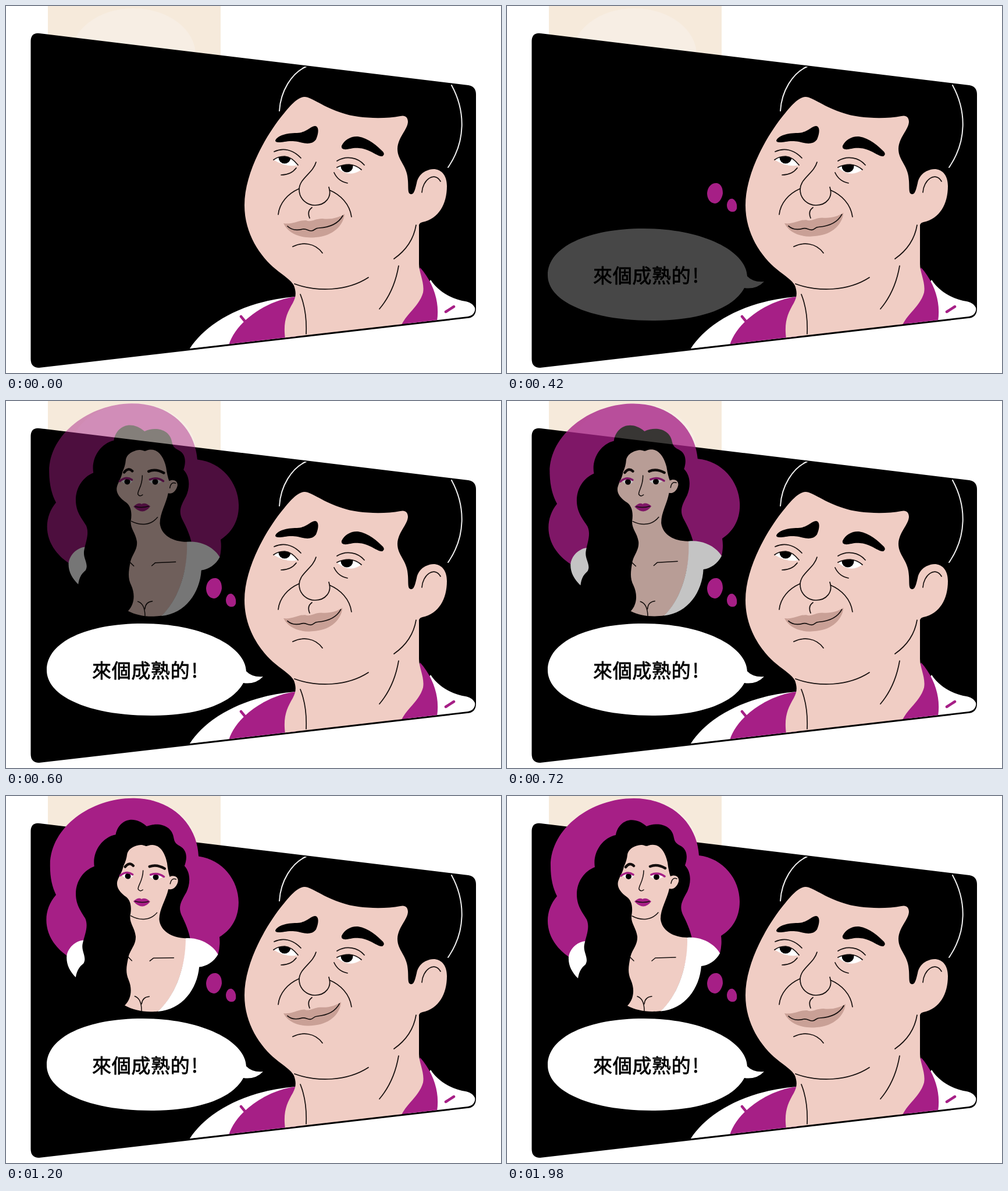
Write an HTML page that moves like this. It is 851 px wide and 630 px high and loops after 2.4 s.

```html
<!DOCTYPE html>
<html lang="zh-Hant">
<head>
<meta charset="utf-8">
<style>
  html, body { margin: 0; width: 100%; height: 100%; overflow: hidden; background: #fff; }
  svg { display: block; }
  .skin { fill: #f0cdc4; }
  .plum { fill: #a61f86; }
  .white { fill: #fff; }
  .line { fill: none; stroke: #150f0e; stroke-width: 1.7; stroke-linecap: round; stroke-linejoin: round; }
  .mark { fill: none; stroke: #a61f86; stroke-width: 4.5; stroke-linecap: round; }
  text { font: 500 33px "Noto Sans CJK TC", "Noto Sans CJK", sans-serif; letter-spacing: .7px; stroke: #000; stroke-width: .8px; }
</style>
</head>
<body>
<svg width="851" height="630" viewBox="0 0 851 630">
  <defs>
    <clipPath id="panel">
      <path d="M44 62Q44 46 60 49L794 138Q806.500 140 806.500 153V518Q806.500 531 794 533L60 617.500Q44 619 44 603Z"/>
    </clipPath>
    <clipPath id="eyeL"><path id="ballL" d="M460 264Q468 258 479 258Q491 259 502 273Q483 278 460 264Z"/></clipPath>
    <clipPath id="eyeR"><path id="ballR" d="M569 277Q579 272 590 272Q602 273 611 281Q597 291 583 286Q575 283 569 277Z"/></clipPath>
  </defs>

  <path fill="#f6eadb" d="M72 0H369V100H72Z"/>
  <ellipse cx="219" cy="84" rx="107" ry="80" fill="#f7eee4"/>
  <path d="M42.500 61Q42.500 45 58 47L795 136Q808 138 808 152V519Q808 534 795 535.800L59 620.800Q42.500 622 42.500 606Z"/>

  <g id="man" clip-path="url(#panel)">
    <path class="white" d="M316 588C343 546 405 507 497 499L500 568L316 588.500ZM730 470C745 493 770 504 790 507C800 509 807 515 807 523V545H680Z"/>
    <path class="plum" d="M497 499C450 505 396 540 383 582L500 570ZM712 449C735 475 746 508 741 541L670 552Z"/>
    <path class="skin" d="M513 156C498 157 483 178 467 198C442 232 410 290 410 342C410 391 437 430 464 452C477 463 490 470 495 480C499 491 499 499 493 510C483 527 476 542 480 571L680 547C690 527 711 514 717 492C720 475 710 458 710 443V376Q711 372 716 371C744 365 758 340 758 309C758 289 747 280 735 280C717 281 708 293 706 304C704 312 702 323 697 323C690 323 692 314 691 300C690 273 673 266 673 245C674 225 690 213 691 199C691 190 685 187 678 189C646 195 601 192 579 184C546 174 523 155 513 156Z"/>
    <path class="line" style="stroke:#eee;stroke-width:2" d="M470 180C472 146 491 115 516 104M766 136C790 180 791 232 760 277"/>
    <path d="M463 231C467 222 482 218 500 218C518 217 523 206 532 206C539 208 537 220 533 229C526 239 513 236 502 233C486 230 478 234 469 234Q463 234 463 231ZM577 240C582 229 594 223 605 224C624 227 638 240 648 250Q652 255 647 258C638 259 626 245 607 244C594 243 589 247 581 246Q576 245 577 240Z"/>
    <use href="#ballL" class="white"/><circle cx="479" cy="260" r="10.500" clip-path="url(#eyeL)"/>
    <use href="#ballR" class="white"/><circle cx="586" cy="275" r="10.500" clip-path="url(#eyeR)"/>
    <path class="line" d="M460 264Q468 258 479 258Q491 259 502 273M569 277Q579 272 590 272Q602 273 611 281
      M461 250C476 243 493 246 507 261M473 290Q490 290 499 278M569 266C585 256 605 260 616 273M564 286Q571 301 587 304
      M533 268C528 287 504 296 504 315C504 332 518 342 531 342C549 342 561 328 555 311
      M503 314C485 322 470 338 468 358M556 316C575 324 591 340 594 362M526 346Q517 352 522 364
      M493 413C509 405 531 406 544 424M496 477C535 491 586 490 623 466M705 376C701 400 687 420 667 434
      M675 446C670 475 659 500 642 520M506 495C514 515 517 540 516 563M715 320C716 299 736 283 747 301"/>
    <path class="mark" d="M404 533L411 541.500M756 525L770 516"/>
    <g id="mouth">
      <path fill="#c9a096" d="M477 373C491 376 504 367 516 368C524 372 531 365 544 365C559 367 573 363 582 357C580 377 562 395 533 397C506 400 485 390 477 373Z"/>
      <path class="line" d="M484 378C492 386 502 385 510 383C517 382 519 386 525 386C531 386 530 381 538 381C557 380 571 374 579 360"/>
    </g>
  </g>

  <g id="dream">
    <path class="plum" d="M75 120C75 55 145 4 218 4C284 4 327 48 330 102C372 107 400 143 400 181C400 210 386 229 368 240Q370 255 366 270L334 290H230L106 276C65 248 60 202 86 172C79 158 75 142 75 120Z"/>
    <path class="white" d="M106 276C108 262 121 250 135 249L142 285C128 292 124 301 122 313C111 302 105 290 106 276Z"/>
    <path d="M187 67C191 43 216 31 240 52C259 44 284 49 287 72C289 83 296 83 302 88C312 97 309 111 306 119C318 132 316 151 310 164C301 180 296 189 302 203C309 217 315 230 318 245L230 320L207 360L145 345L122 318C125 298 137 292 137 282C137 273 131 266 133 255C136 240 143 226 137 212C130 200 120 189 120 169C120 147 133 129 151 122C147 98 163 72 187 67Z"/>
    <path class="skin" d="M207 101C209 89 223 84 232 84C239 85 238 87 243 85C261 79 272 95 276 114Q278 130 281 138C288 134 297 138 295 147C292 157 285 161 279 159C275 178 264 193 264 211C266 231 286 243 311 243C311 292 294 342 265 369C242 372 222 368 207 360C218 349 220 332 213 316C207 303 209 292 212 277C215 263 225 256 224 241C222 226 213 219 214 206C217 190 214 180 207 174C194 165 189 156 191 147C194 137 199 132 201 121Q206 111 207 101Z"/>
    <path class="white" d="M310 243C335 241 357 254 366 270C359 283 346 291 334 292C331 330 306 366 264 369.500C294 342 311 292 310 243Z"/>
    <path class="line" style="stroke-width:4.500" d="M204 122Q211 113 218 120M246 121Q258 116 272 124"/>
    <path class="white" d="M199 137Q209 130 218 138Q209 147 199 137ZM246 138Q257 131 268 139Q256 147 246 138Z"/>
    <circle cx="209" cy="138" r="5"/><circle cx="257" cy="139" r="5"/>
    <path class="mark" style="stroke-width:3.500" d="M196 137Q207 128 217 135M248 135Q260 130 271 138"/>
    <path class="plum" d="M219 181Q228 173 233 177Q239 173 248 181Q235 198 219 181Z"/>
    <path class="line" style="stroke-width:1.500" d="M222 181Q233 184 245 181M235 128C235 146 226 154 227 160Q230 165 235 161M215 206C232 215 249 213 260 200M282 150Q284 139 292 142
      M249 283L255 278L290 277M212 277L218 283M224 344Q236 348 236 369M249 344Q237 345 236 357"/>
  </g>

  <path id="dotBig" class="plum" d="M344 321C345 309 353 303 361 304C369 306 371 314 371 322C369 333 363 339 357 339C349 338 344 331 344 321Z"/>
  <path id="dotSmall" class="plum" d="M378 341C379 333 384 330 388 331C394 334 396 341 395 348C393 353 389 354 385 353C380 351 378 347 378 341Z"/>

  <g id="speech">
    <path class="white" d="M70 462C70 413 140 382 235 382C337 382 412 421 413 464Q424 475 442 473Q429 487 408 484C389 519 333 540 250 540C145 540 70 508 70 462Z"/>
    <text x="148" y="475">來個成熟的<tspan dx="2.500">!</tspan></text>
  </g>
</svg>
<script>
const LOOP = 2400, STEP = 60;
const el = id => document.getElementById(id);
const ramp = (t, a, b) => Math.min(1, Math.max(0, (t - a) / (b - a)));
const ease = x => x * x * (3 - 2 * x);
const fade = (id, t, a, b) => el(id).setAttribute('opacity', ramp(t, a, b));

function draw(now) {
  const t = Math.floor(now % LOOP / STEP) * STEP;
  fade('dotSmall', t, 60, 240);
  fade('dotBig', t, 180, 360);
  fade('speech', t, 360, 575);
  fade('dream', t, 420, 810);

  // One and a half swings, then rest
  const swing = -1.75 * Math.sin(ramp(t, 540, 1620) * 3 * Math.PI);
  el('dream').setAttribute('transform', `rotate(${swing} 235 172)`);

  // The smile tightens in two stages and relaxes
  const smile = (.6 * ease(ramp(t, 0, 300)) + .4 * ease(ramp(t, 720, 900))) * (1 - ease(ramp(t, 1680, 1980)));
  el('mouth').setAttribute('transform',
    `translate(477 373) rotate(${-2.5 * smile}) scale(${1 - .05 * smile}) translate(-477 -373)`);
  requestAnimationFrame(draw);
}
draw(0);
</script>
</body>
</html>
```
